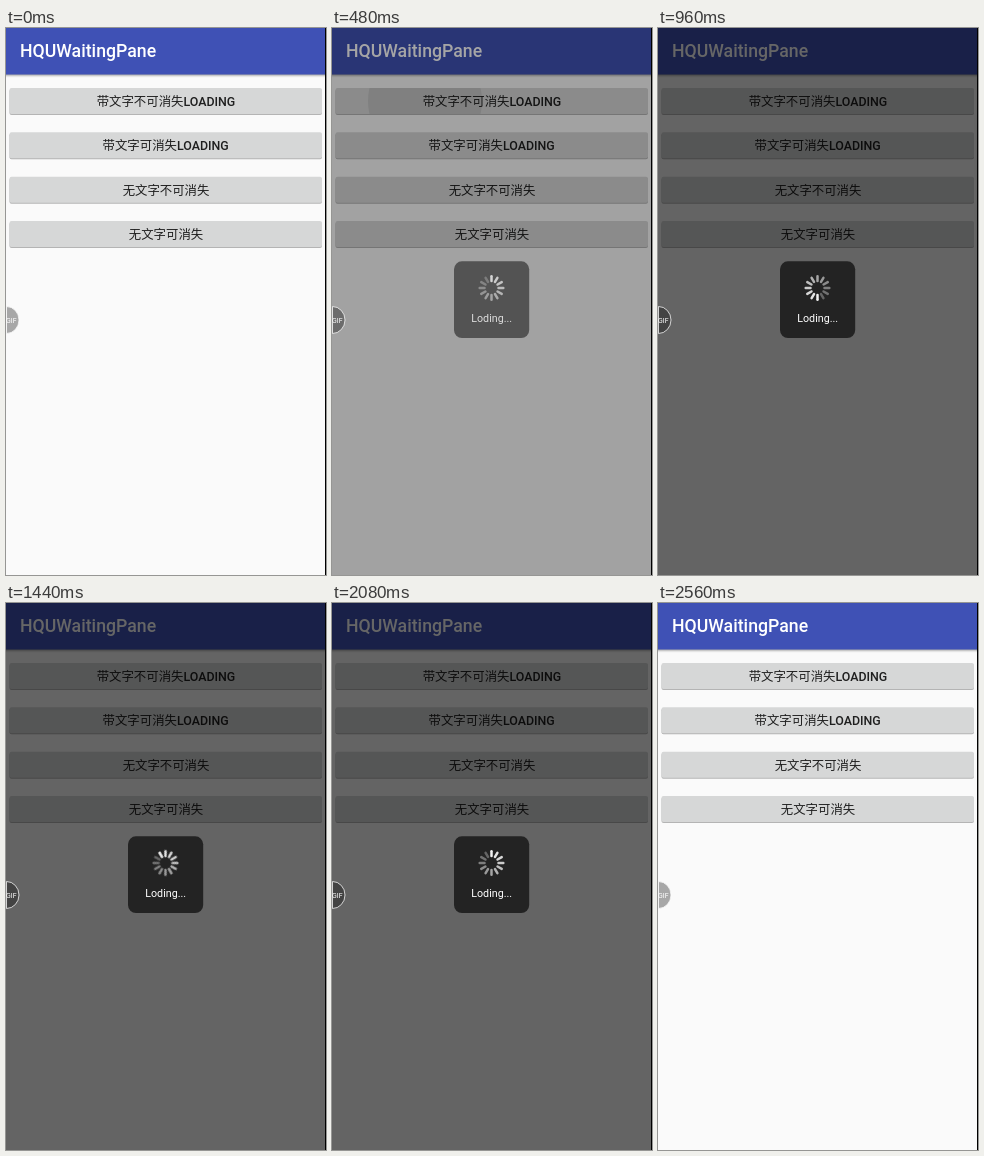
Write an HTML page that moves like this. It is 320 by 547 pixels and loops after 3.04 s.

```html
<!DOCTYPE html>
<html lang="zh-CN">
<head>
<meta charset="utf-8">
<title>Loading dialog</title>
<style>
  html, body { margin: 0; width: 100%; height: 100%; overflow: hidden; background: #fafafa; }
  svg { display: block; width: 100%; height: 100%; }
  text { font-family: Roboto, "Noto Sans CJK SC", "Noto Sans CJK", sans-serif; }
  .title { font-size: 17.7px; font-weight: 500; fill: #fff; }
  .bar { fill: #3f51b5; filter: drop-shadow(0 1.5px 1.2px rgba(0, 0, 0, .4)); }
  .button rect { fill: #d6d7d7; filter: drop-shadow(0 1px .6px rgba(0, 0, 0, .28)); }
  .button text { font-size: 12.4px; fill: #1f1f1f; text-anchor: middle; }
  .latin { font-weight: 500; }
  .message { font-size: 10.7px; fill: #fff; text-anchor: middle; }
  .badge { fill: rgba(0, 0, 0, .33); stroke: rgba(255, 255, 255, .75); }
  .badge-label { font-size: 7px; fill: #fff; }

  .ripple, .dim, .dialog, .spinner { animation: 3040ms step-end infinite; }
  .ripple { animation-name: ripple; transform-origin: 93px 73px; }
  .dim { animation-name: dim; }
  .dialog { animation-name: dialog; }
  .spinner { animation-name: spin; transform-origin: 159.5px 260px; }

  @keyframes ripple {
    0% { opacity: 0; transform: scale(.4); }
    10.526% { opacity: .08; transform: scale(.5); }
    15.789% { opacity: .08; transform: scale(1); }
    21.052%, 100% { opacity: 0; transform: scale(1); }
  }
  @keyframes dim {
    0% { opacity: 0; }
    15.789% { opacity: .353; }
    21.052% { opacity: .6; }
    78.947% { opacity: .353; }
    84.21%, 100% { opacity: 0; }
  }
  @keyframes dialog {
    0% { opacity: 0; }
    15.789% { opacity: .62; }
    21.052% { opacity: 1; }
    78.947% { opacity: .52; }
    84.21%, 100% { opacity: 0; }
  }
  /* Two spokes per tick, then uneven holds as the app stalls. */
  @keyframes spin {
    0% { transform: rotate(0deg); }
    15.789% { transform: rotate(0deg); animation-timing-function: steps(5, end); }
    42.105% { transform: rotate(300deg); }
    47.368% { transform: rotate(330deg); }
    52.631% { transform: rotate(390deg); }
    63.157% { transform: rotate(660deg); }
    68.421% { transform: rotate(720deg); }
    78.947%, 100% { transform: rotate(750deg); }
  }
</style>
</head>
<body>
<svg viewBox="0 0 320 547" preserveAspectRatio="none">
  <defs>
    <clipPath id="first-button"><rect x="3.5" y="60" width="312.5" height="26" rx="2"/></clipPath>
  </defs>
  <rect width="320" height="547" fill="#fafafa"/>
  <rect class="bar" x="-5" y="-5" width="330" height="51.5"/>
  <text class="title" x="14" y="28.6">HQUWaitingPane</text>

  <g class="button">
    <rect x="3.5" y="60" width="312.5" height="26" rx="2"/>
    <g clip-path="url(#first-button)"><circle class="ripple" cx="93" cy="73" r="57"/></g>
    <text x="160" y="78">带文字不可消失<tspan class="latin">LOADING</tspan></text>
  </g>
  <g class="button" transform="translate(0 44.2)">
    <rect x="3.5" y="60" width="312.5" height="26" rx="2"/>
    <text x="159.7" y="78">带文字可消失<tspan class="latin">LOADING</tspan></text>
  </g>
  <g class="button" transform="translate(0 88.7)">
    <rect x="3.5" y="60" width="312.5" height="26" rx="2"/>
    <text x="160" y="78">无文字不可消失</text>
  </g>
  <g class="button" transform="translate(0 133)">
    <rect x="3.5" y="60" width="312.5" height="26" rx="2"/>
    <text x="160" y="78">无文字可消失</text>
  </g>

  <rect class="dim" width="320" height="547"/>
  <g class="dialog">
    <rect x="122" y="233.3" width="75.2" height="76.7" rx="8" fill="#232323"/>
    <g class="spinner"></g>
    <text class="message" x="159.7" y="294">Loding...</text>
  </g>

  <path class="badge" d="M.5 278.5A12.5 13.5 0 0 1 .5 305.5Z"/>
  <text class="badge-label" x="0" y="294.5">GIF</text>
  <rect x="319" width="1" height="547"/>
</svg>
<script>
  // Spokes fade clockwise, starting from the brightest at the top.
  const SPOKES = 12;
  const spinner = document.querySelector('.spinner');
  for (let i = 0; i < SPOKES; i++) {
    const spoke = document.createElementNS(spinner.namespaceURI, 'line');
    const attributes = {
      x1: 159.5, x2: 159.5, y1: 253, y2: 248.2,
      stroke: '#f2f2f2', 'stroke-width': 2.5, 'stroke-linecap': 'round',
      opacity: 1 - 0.68 * i / (SPOKES - 1),
      transform: `rotate(${i * 360 / SPOKES} 159.5 260)`
    };
    for (const name in attributes) spoke.setAttribute(name, attributes[name]);
    spinner.append(spoke);
  }
</script>
</body>
</html>
```
